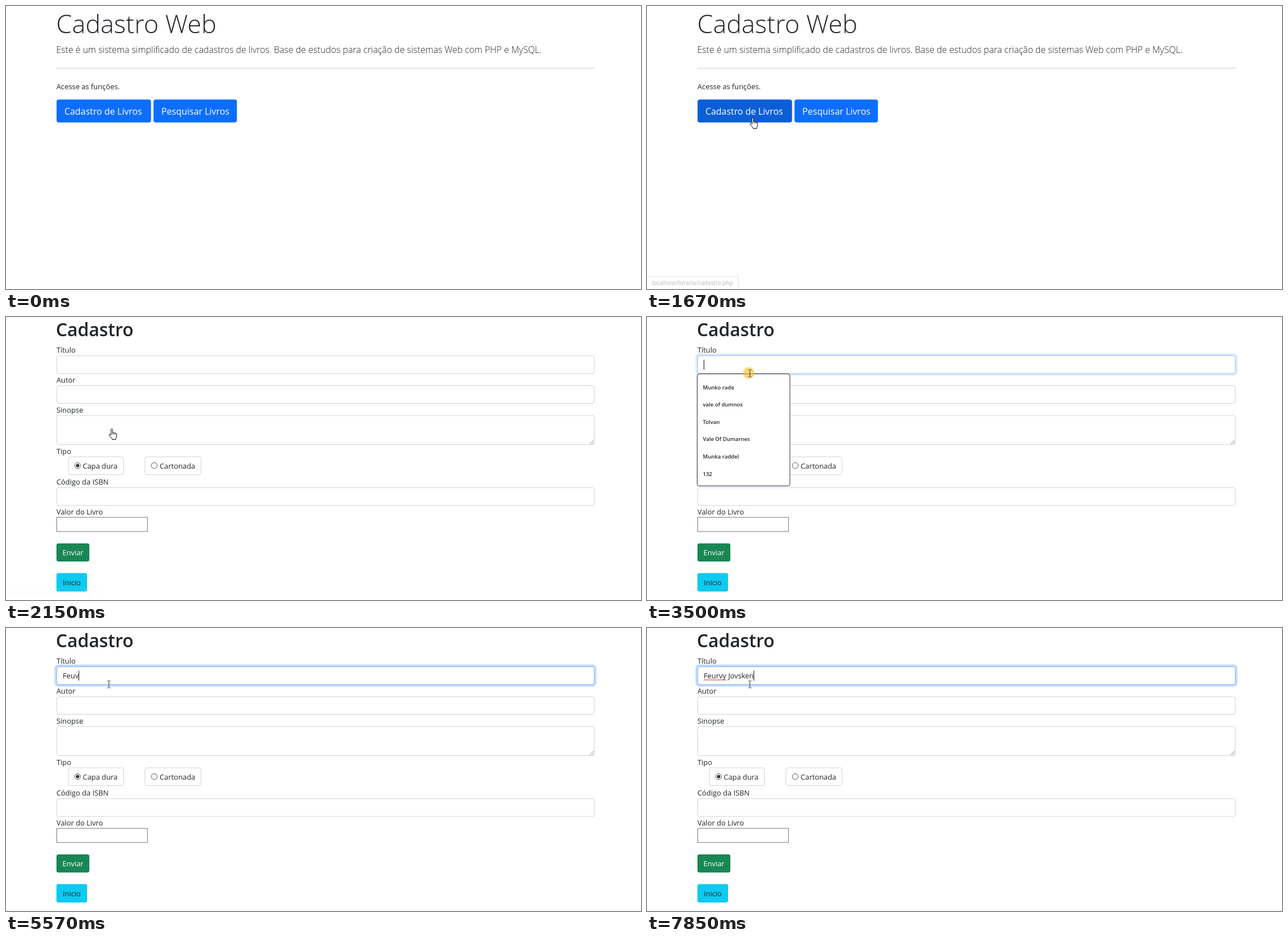
Recreate the animation shown at these times as an HTML page. Size 1120 by 500 pixels, loop 8000 ms.

```html
<!DOCTYPE html>
<html lang="pt-BR">
<head>
<meta charset="utf-8">
<title>Cadastro Web</title>
<style>
html, body { margin: 0; width: 100%; height: 100%; overflow: hidden; background: #fff; }
svg { display: block; width: 100vw; height: 100vh; }
text { font: 12.83px "Open Sans", "Noto Sans", sans-serif; fill: #212529; white-space: pre; }
.display { font-size: 44.8px; font-weight: 300; }
.lead { font-size: 15.83px; font-weight: 300; }
.big { font-size: 15.9px; font-weight: 500; fill: #fff; }
.h1 { font-size: 31.7px; font-weight: 600; }
.light { fill: #fff; }
.status { font-size: 10.1px; fill: #5f6368; }
.option { font-size: 9.5px; font-weight: 600; }
.field { fill: #fff; stroke: #ced4da; }
</style>
</head>
<body>
<svg id="stage" viewBox="0 0 1120 500"></svg>
<script>
const LOOP = 8000;
const stage = document.getElementById('stage');

const text = (x, y, s, cls = '') => `<text x="${x}" y="${y}" class="${cls}">${s}</text>`;
const rect = (x, y, x2, y2, attrs) =>
  `<rect x="${x}" y="${y}" width="${x2 - x}" height="${y2 - y}" ${attrs}/>`;
const field = (x, y, x2, y2) => rect(x + .5, y + .5, x2 - .5, y2 - .5, 'rx="3.4" class="field"');
const radio = (x, on) =>
  `<circle cx="${x}" cy="262.5" r="5.2" fill="#fff" stroke="#555"/>` +
  (on ? `<circle cx="${x}" cy="262.5" r="3" fill="#333"/>` : '');

const home = `<g id="home">
  ${text(88.6, 48, 'Cadastro Web', 'display')}
  ${text(88.5, 83, 'Este é um sistema simplificado de cadastros de livros. Base de estudos para criação de sistemas Web com PHP e MySQL.', 'lead')}
  ${rect(89, 109.5, 1038, 110.5, 'fill="#c8c9ca"')}
  ${text(89, 146.5, 'Acesse as funções.')}
  ${rect(89.2, 165.2, 255.8, 205.8, 'rx="4" id="button"')}
  ${text(103, 192, 'Cadastro de Livros', 'big')}
  ${rect(260.2, 165.2, 407.3, 205.8, 'rx="4" fill="#0d6efd"')}
  ${text(274, 192, 'Pesquisar Livros', 'big')}
</g>`;

const form = `<g id="form">
  ${text(88, 34, 'Cadastro', 'h1')}
  ${text(89, 63, 'Título')}
  ${rect(87.3, 66.3, 1039.7, 101.7, 'rx="5" id="glow" fill="none" stroke="#0d6efd" stroke-width="3.4"')}
  ${field(89, 68, 1038, 100.5)}
  ${rect(89.5, 68.5, 1037.5, 100, 'rx="3.4" id="focus" fill="none" stroke="#86b7fe"')}
  ${text(100, 89, '', 'typed')}
  <path id="squiggle" fill="none" stroke="#e02020"/>
  <path id="caret" d="M0 75.5v17.5" stroke="#111"/>
  ${text(89, 116, 'Autor')}
  ${field(89, 121, 1038, 153)}
  ${text(89, 168.5, 'Sinopse')}
  ${field(89, 173.5, 1038, 226)}
  <path d="M1029.5 224.5l7-7M1033.5 224.5l3-3" stroke="#777" stroke-width=".9"/>
  ${text(89, 242, 'Tipo')}
  ${field(109.5, 246.5, 208, 279)}${radio(126.3, true)}${text(135.3, 268, 'Capa dura')}
  ${field(244.5, 246.5, 344.5, 279)}${radio(261.5, false)}${text(271, 268, 'Cartonada')}
  ${text(89, 296, 'Código da ISBN')}
  ${field(89, 301, 1038, 333.5)}
  ${text(89, 348.5, 'Valor do Livro')}
  ${rect(89.5, 354, 249.5, 379, 'fill="#fff" stroke="#767676"')}
  ${rect(89, 400, 147, 432, 'rx="3.4" fill="#198754"')}${text(99.5, 421, 'Enviar', 'light')}
  ${rect(89, 452.5, 143, 485, 'rx="3.4" fill="#0dcaf0"')}${text(100, 473.5, 'Inicio')}
</g>`;

const options = ['Munko rade', 'vale of dumnos', 'Tolvan', 'Vale Of Dumarnes', 'Munka raddel', '132'];
const list = `<g id="list">
  ${rect(88.5, 100.5, 252, 298.5, 'rx="3.5" fill="#fff" stroke="#2b2b3a"')}
  ${options.map((s, i) => text(98.5, 127.5 + i * 30.6, s, 'option')).join('')}
</g>`;

const status = `<g id="status">
  ${rect(-1, 477.5, 160.5, 501, 'fill="#fff" stroke="#bbb"')}
  ${text(8.5, 493, 'localhost/livraria/cadastro.php', 'status')}
</g>`;

const pointers = `<circle id="click" r="10.2" fill="#f6c02c" opacity=".62"/>
<g id="pointer">
  <path id="arrow" d="M.5 .8v13.4l3-2.8 2.1 4.9 2-.9-2.1-4.8h4.2z" fill="#fff" stroke="#000" stroke-linejoin="round"/>
  <g id="hand" stroke="#000" stroke-linejoin="round">
    <path d="M4.2 11.6V2.2q0-1.6 1.4-1.6T7 2.2v5q1.8-1 2.4.6 1.8-.8 2.4.7 2.3-.6 2.3 1.6v3.6q0 2.6-1.6 4.2v1.6H6.2v-1.4L1.3 12.8Q.2 10.8 1.8 10.2q1-.2 2.4 1.6z" fill="#fff"/>
    <path d="M7 7.2v3.3M9.4 7.8v2.7M11.8 8.6v2" stroke-width=".9"/>
  </g>
  <path id="beam" d="M-2.8-6.2h1.8l1 .8 1-.8h1.8M0-5.4V5.4M-2.8 6.2h1.8l1-.8 1 .8h1.8" fill="none" stroke="#333"/>
</g>`;

stage.innerHTML = home + form + list + status + pointers;
const el = {};
stage.querySelectorAll('[id]').forEach(n => el[n.id] = n);
const typed = stage.querySelector('.typed');

// Tracks hold each value until the next time.
const path = [
  [190, 'arrow', 906, 445], [260, 'arrow', 853, 434],
  [470, 'arrow', 780, 402], [540, 'arrow', 680, 362], [610, 'arrow', 600, 334],
  [810, 'arrow', 495, 316], [880, 'arrow', 400, 299], [940, 'arrow', 327, 286],
  [1130, 'arrow', 250, 254], [1200, 'arrow', 206, 233],
  [1470, 'arrow', 195, 215], [1540, 'hand', 181, 197],
  [2620, 'beam', 188, 180], [2690, 'beam', 186, 134], [2750, 'arrow', 183, 104],
  [3170, 'beam', 182, 103], [3230, 'beam', 181.5, 99.5]
];
const clicks = [[1810, 2010, 186, 198], [2950, 3110, 183, 103.5], [3430, 3560, 179.5, 99]];
const hover = [[0, '#0d6efd'], [1540, '#0c68ef'], [1600, '#0b61df'], [1670, '#0b5ed7']];
const statusFade = [[0, 0], [1600, .15], [1670, .45], [1740, .8], [1810, 1], [2080, .4], [2150, .03], [2220, 0]];
const focusFade = [[0, 0], [3430, .15], [3500, .6], [3560, 1]];
const listFade = [[0, 0], [3500, 1], [4040, .85], [4110, .55], [4180, .25], [4240, 0]];
const keys = [
  [3970, 'F'], [4110, 'e'], [4380, 'u'], [4570, 'v'], [5630, 'back'], [5830, 'r'], [6170, 'v'],
  [6310, 'y'], [6580, ' '], [6780, 'J'], [6920, 'o'], [7250, 'v'], [7380, 's'], [7590, 'k'],
  [7660, 'e'], [7850, 'n']
];

const at = (track, t) => track.filter(k => k[0] <= t).pop();
const value = (track, t) => at(track, t)[1];
const show = (node, on) => node.style.display = on ? '' : 'none';

let zigzag = 'M100 92.5';
for (let i = 0; i < 20; i++) zigzag += `l2 ${i % 2 ? 1.6 : -1.6}`;
el.squiggle.setAttribute('d', zigzag);

function drawPointer(t) {
  const p = at(path, t);
  show(el.pointer, p);
  if (p) {
    for (const kind of ['arrow', 'hand', 'beam']) show(el[kind], kind === p[1]);
    el.pointer.setAttribute('transform', `translate(${p[2]} ${p[3]})`);
  }
  const c = clicks.find(([from, to]) => t >= from && t < to);
  show(el.click, c);
  if (c) {
    el.click.setAttribute('cx', c[2]);
    el.click.setAttribute('cy', c[3]);
  }
}

function drawInput(t) {
  const word = keys.filter(k => k[0] <= t)
    .reduce((s, [, key]) => key === 'back' ? s.slice(0, -1) : s + key, '');
  if (typed.textContent !== word) typed.textContent = word;
  const end = word ? typed.getComputedTextLength() : 0;
  el.caret.setAttribute('transform', `translate(${Math.round(100 + end) + .5} 0)`);
  show(el.caret, t >= 3430 && !(t >= 5030 && t < 5570));
  show(el.squiggle, t >= 6640);

  const focus = value(focusFade, t);
  el.focus.setAttribute('opacity', focus);
  el.glow.setAttribute('opacity', focus * .25);

  const fade = value(listFade, t);
  const scale = 1 - (1 - fade) * .045;
  el.list.setAttribute('opacity', fade);
  el.list.setAttribute('transform', `translate(170 200) scale(${scale}) translate(-170 -200)`);
}

function draw(t) {
  const onForm = t >= 2080;
  show(el.home, !onForm);
  show(el.form, onForm);
  el.button.setAttribute('fill', value(hover, t));
  el.status.setAttribute('opacity', value(statusFade, t));
  drawInput(t);
  drawPointer(t);
}

const start = performance.now();
function tick() {
  draw((performance.now() - start) % LOOP);
  requestAnimationFrame(tick);
}
tick();
</script>
</body>
</html>
```
